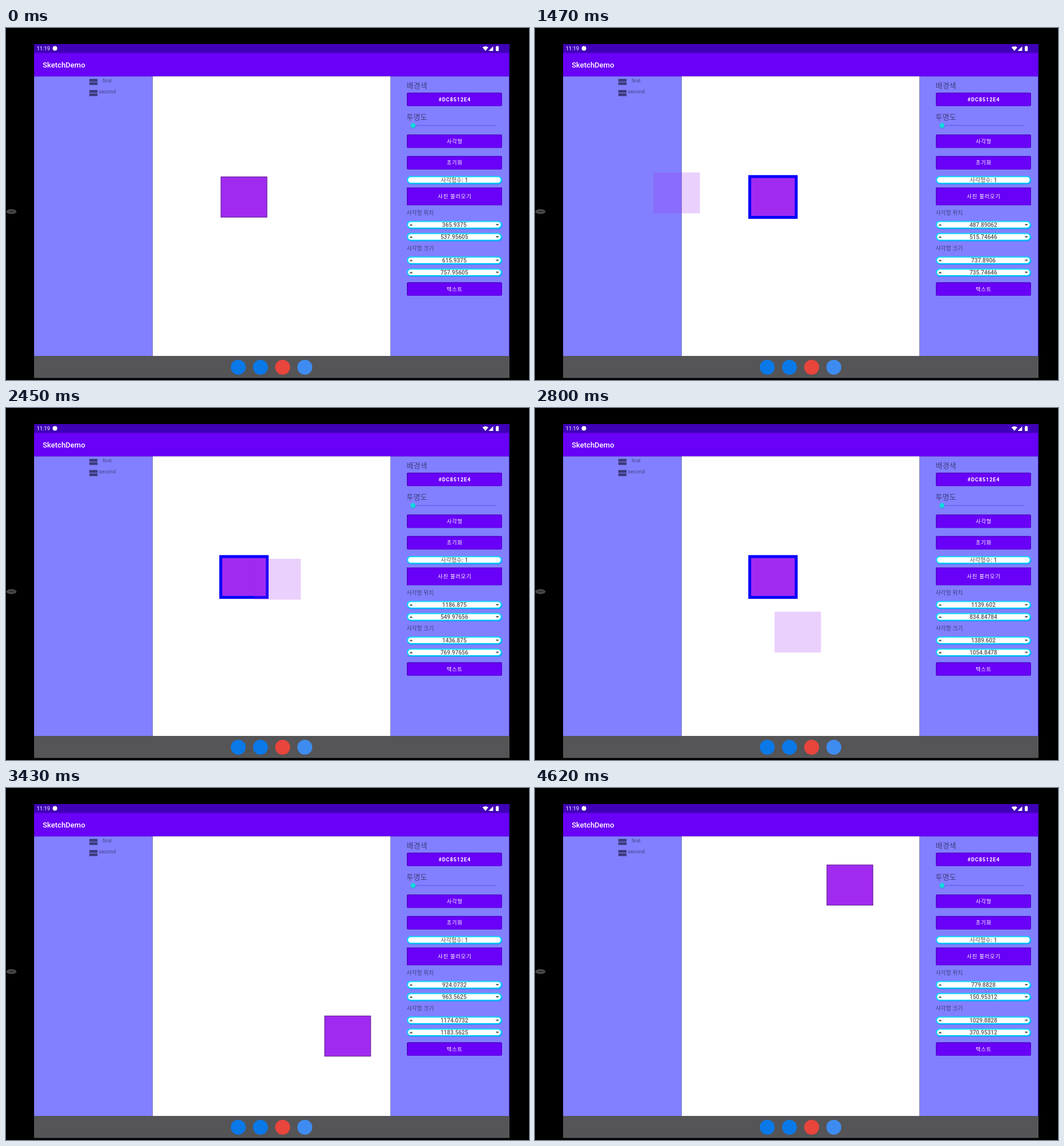
An HTML page with a canvas that plays this animation: 912 px wide and 614 px high, repeating every 6300 ms.

```html
<!DOCTYPE html>
<html lang="ko">
<head>
<meta charset="utf-8">
<title>Drag and drop</title>
<style>
html, body { margin: 0; width: 100%; height: 100%; overflow: hidden; background: #000; }
canvas { display: block; }
</style>
</head>
<body>
<canvas id="stage" width="912" height="614"></canvas>
<script>
const ctx = document.getElementById('stage').getContext('2d');
const LOOP = 6300, STEP = 70;
const SCALE = 0.324, TOP = 84.8, GHOST_LEFT = 48.5, CANVAS_LEFT = 255.9;
const RECT_W = 250, RECT_H = 220;
const FONT = 'Roboto, "Noto Sans CJK KR", "Noto Sans CJK", sans-serif';
const PURPLE = '#6900f7', FILL = 'rgb(161,42,241)';

// Each drag: moment of selection, moment of drop, and time, x, y along the path.
const start = [365.9375, 537.95605];
const drags = [
  { select: 210, drop: 3430, path: [
    [1050, 1004.6143, 463.58203], [1260, 776.21875, 117.90234],
    [1470, 487.890625, 515.74646], [1680, 575.6172, 479.01562],
    [1960, 825.9375, 347.938], [2380, 1174.4297, 497.53906],
    [2450, 1186.875, 549.9765625], [2730, 1162.0312, 803.08984],
    [3080, 1016.8572, 899.98987], [3290, 924.0732, 963.5625]] },
  { select: 3990, drop: 4620, path: [
    [3990, 1300.9258, 1015.8672], [4060, 1017.0352, 899.06445],
    [4130, 774.50964, 745.26587], [4305, 730.0078, 454.32031],
    [4480, 779.8828, 150.953125]] }
];

function along(path, time) {
  const last = path.length - 1;
  if (time >= path[last][0]) return path[last].slice(1);
  let i = 0;
  while (time >= path[i + 1][0]) i++;
  const a = path[i], b = path[i + 1];
  const before = path[Math.max(i - 1, 0)], after = path[Math.min(i + 2, last)];
  const span = b[0] - a[0], u = (time - a[0]) / span;
  return [1, 2].map(k => {
    const m0 = (b[k] - before[k]) / (b[0] - before[0]) * span;
    const m1 = (after[k] - a[k]) / (after[0] - a[0]) * span;
    const d = b[k] - a[k];
    return a[k] + u * (m0 + u * (3 * d - 2 * m0 - m1 + u * (m0 + m1 - 2 * d)));
  });
}

function stateAt(time) {
  const state = { rect: start, values: start, ghost: null, selected: false };
  for (const { select, drop, path } of drags) {
    if (time < select) break;
    const dropped = time >= drop;
    state.selected = !dropped;
    state.ghost = null;
    if (time >= path[0][0]) {
      state.values = along(path, time);
      if (dropped) state.rect = state.values;
      else state.ghost = state.values;
    }
  }
  return state;
}

// Shortest decimal that identifies a 32-bit float.
function floatText(value) {
  const f = Math.fround(value);
  for (let digits = 7; digits < 9; digits++) {
    const text = (f - 1e-9).toPrecision(digits);
    if (Math.fround(text) === f) return String(Number(text));
  }
  return String(Number(f.toPrecision(9)));
}

function box(x, y, w, h, color, radius = 0) {
  ctx.fillStyle = color;
  ctx.beginPath();
  ctx.roundRect(x, y, w, h, radius);
  ctx.fill();
}

function disc(x, y, rx, color, ry = rx) {
  ctx.fillStyle = color;
  ctx.beginPath();
  ctx.ellipse(x, y, rx, ry, 0, 0, 7);
  ctx.fill();
}

function shape(color, ...points) {
  ctx.fillStyle = color;
  ctx.beginPath();
  points.forEach(p => ctx.lineTo(...p));
  ctx.fill();
}

function label(text, x, y, size, color, { weight = 400, align = 'left', spacing = 0 } = {}) {
  ctx.font = `${weight} ${size}px ${FONT}`;
  ctx.textAlign = align;
  ctx.letterSpacing = spacing + 'px';
  ctx.fillStyle = color;
  ctx.fillText(text, x, y);
}

function button(text, y, h, radius = 2, weight = 500) {
  box(699, y, 166, h, '#4b00bd', radius);
  box(700.3, y + 1.3, 164.2, h - 1.8, PURPLE, radius);
  label(text, 782.4, y + h / 2 + 3.4, 9.2, '#fff', { weight, align: 'center', spacing: 0.8 });
}

function pill(text, y, arrows = true) {
  box(700, y - 5.6, 165.5, 13.4, '#1a98f5', 7);
  box(699, y - 6.8, 165.5, 13, '#0ed9fa', 7);
  box(701.2, y - 4.8, 161.4, 9.6, '#fff', 5);
  label(text, 781.8, y + 3.5, 10, '#555', { weight: 500, align: 'center' });
  if (!arrows) return;
  shape('#555', [703.4, y + 1.6], [706.4, y - 1.5], [709.4, y + 1.6]);
  shape('#555', [853.8, y - 1.3], [859.8, y - 1.3], [856.8, y + 1.8]);
}

function drawStatus() {
  box(49, 28, 829, 15.5, '#3f00b8');
  label('11:19', 53.5, 39.3, 9.3, '#fff');
  disc(85.3, 35.6, 4, '#fff');
  ctx.fillStyle = '#fff';
  ctx.beginPath();
  ctx.moveTo(836, 40);
  ctx.arc(836, 40, 8, -Math.PI * 0.72, -Math.PI * 0.28);
  ctx.fill();
  shape('#fff', [841.5, 40], [849.5, 40], [849.5, 32]);
  box(854.2, 32, 5, 8.3, '#fff', 0.8);
  box(855.7, 31.2, 2, 1.2, '#fff');
}

function drawFrame() {
  box(0, 0, 912, 614, '#000');
  disc(9.5, 320.3, 8.8, '#484848', 4.3);
  box(5.5, 319.5, 8, 1.5, '#222');
  drawStatus();
  box(49, 43.3, 829, 41.5, PURPLE);
  label('SketchDemo', 64, 69.3, 13, '#fff', { weight: 500 });
  box(49, 84.6, 829, 487.6, '#8280ff');
  box(255.4, 84.6, 415.4, 487.6, '#777790');
  box(256, 84.6, 414.2, 487.4, '#fff');
  box(877, 28, 1.6, 544, '#24107c');
  box(49, 572, 829, 38.6, '#555456');
  ['#0b78e8', '#0b78e8', '#e8453c', '#3f8cf0'].forEach((color, i) =>
    disc(405 + i * 38.7, 591.7, 13, color));

  ['first', 'second'].forEach((name, i) => {
    const y = 88.8 + i * 19.4;
    box(145.3, y, 14.3, 4.8, '#3c3a7c');
    box(145.3, y + 5.8, 14.3, 4.8, '#3c3a7c');
    label(name, 176.4, y + 6.2, 9.2, '#454388', { align: 'center' });
  });
}

function drawControls([x, y]) {
  const ink = '#403e80';
  label('배경색', 698.5, 105, 13, ink);
  button('#DC8512E4', 112.7, 23.5, 2, 700);
  label('투명도', 698.5, 160, 13, ink);
  box(709, 169.4, 145, 1.2, '#6550ee');
  disc(709.9, 170.7, 4.7, '#5279df');
  disc(709.7, 170, 4.2, '#10dbdc');
  button('사각형', 185.8, 23.5);
  button('초기화', 223.3, 23.5);
  pill('사각형수: 1', 265, false);
  button('사진 불러오기', 278.3, 31, 0);
  label('사각형 위치', 698.5, 326.3, 9.8, ink);
  pill(floatText(x), 343.2);
  pill(floatText(y), 364.4);
  label('사각형 크기', 698.5, 388, 9.8, ink);
  pill(floatText(x + RECT_W), 405.2);
  pill(floatText(y + RECT_H), 426.3);
  button('텍스트', 443.6, 23.5);
}

function drawRect([x, y], selected) {
  const left = CANVAS_LEFT + x * SCALE, top = TOP + y * SCALE;
  const w = RECT_W * SCALE, h = RECT_H * SCALE;
  box(left, top, w, h, FILL);
  ctx.strokeStyle = selected ? '#0000fa' : '#6a3099';
  ctx.lineWidth = selected ? 5 : 1.2;
  const inset = selected ? 0 : 0.6;
  ctx.strokeRect(left + inset, top + inset, w - 2 * inset, h - 2 * inset);
}

function drawGhost([x, y]) {
  ctx.globalAlpha = 0.22;
  box(GHOST_LEFT + x * SCALE, TOP + y * SCALE, RECT_W * SCALE, RECT_H * SCALE, FILL);
  ctx.globalAlpha = 1;
}

function render() {
  const time = Math.floor(performance.now() % LOOP / STEP) * STEP;
  const { rect, values, ghost, selected } = stateAt(time);
  drawFrame();
  drawControls(values);
  drawRect(rect, selected);
  if (ghost) drawGhost(ghost);
  requestAnimationFrame(render);
}
render();
</script>
</body>
</html>
```
